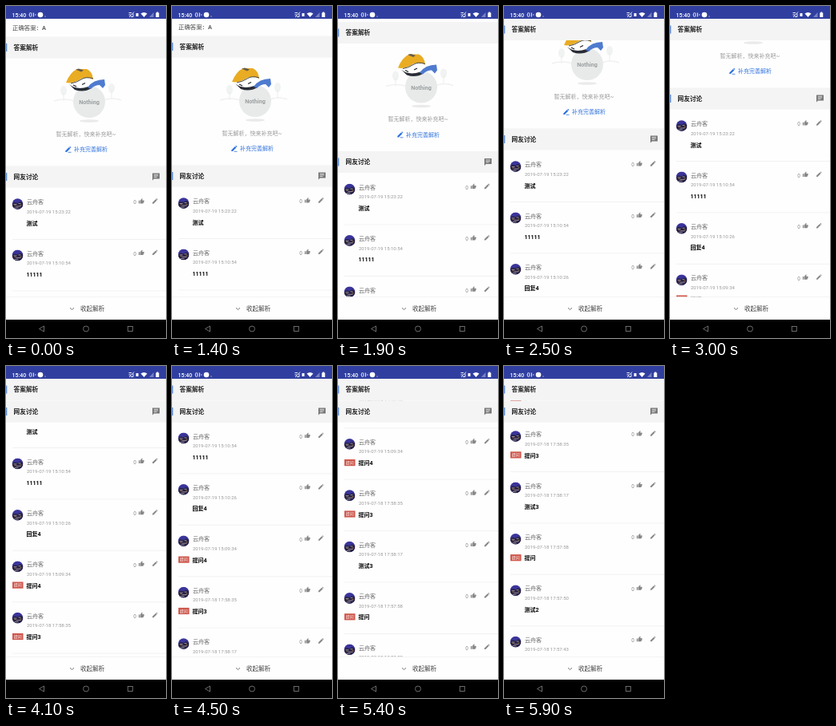
Animation, 200 px wide and 416 px high, one loop 6 s. Source, as an HTML page:

```html
<!DOCTYPE html>
<html lang="zh-CN">
<head>
<meta charset="utf-8">
<style>
  html, body { margin: 0; width: 100%; height: 100%; overflow: hidden; background: #fefefe; }
  svg { display: block; width: 100%; height: 100%; font-family: Roboto, "Noto Sans CJK SC", "Noto Sans CJK", sans-serif; }
</style>
</head>
<body>
<svg id="stage" viewBox="0 0 200 416">
  <defs>
    <clipPath id="disc"><circle r="6.8"/></clipPath>
    <g id="avatar" clip-path="url(#disc)">
      <rect x="-7" y="-7" width="14" height="14" fill="#3b349a"/>
      <path d="M-7 0L-4-2 0-1 3-3 7-1V7H-7Z" fill="#232045"/>
      <path d="M-5 .5h4M1-.5h3M-2 3h6M-4 5h5" stroke="#a99a9c" stroke-width=".9"/>
      <path d="M-4 2h2M3 1.5h2" stroke="#b9742f" stroke-width=".9"/>
    </g>
    <path id="pencil" d="M-3.6 3.6V1.8L1.4-3.2 3.2-1.4-1.8 3.6ZM1.9-3.7 2.5-4.2Q2.8-4.4 3.2-4.1L4.1-3.2Q4.4-2.8 4.2-2.5L3.7-1.9Z"/>
    <path id="thumb" d="M-3.8-.8h1.5v4.2h-1.5ZM-1.7 3.4V-.8L.8-3.9Q1.7-3.6 1.4-2.7L1-1.1H3.2Q4.2-.8 3.8.4L2.7 2.9Q2.4 3.4 1.9 3.4Z"/>
    <g id="tree" fill="#f1f2f2">
      <ellipse cy="-3" rx="4" ry="6"/><path d="M-.4 0h.8v10h-.8Z" fill="#e8eaea"/>
    </g>
  </defs>
  <g id="page"></g>
  <g id="talkHead"></g>
  <g id="answerHead"></g>
  <g id="chrome"></g>
</svg>
<script>
const ROW = 64.4, LOOP = 6000, STEP = 100;
const ANSWER_Y = 52, ANSWER_STOP = 29.5, TALK_Y = 214, TALK_STOP = 57;

// [time in ms, scrolled distance]
const SCROLL = [[0, 0], [1300, 0], [1400, 1], [2000, 22], [2500, 47], [3000, 98], [3600, 155.5],
  [4100, 190], [4500, 222], [5000, 324], [5200, 324], [5400, 343.5], [5900, 417.6]];

const COMMENTS = [
  ['测试', '19 15:23:22'], ['11111', '19 15:10:54'], ['回复4', '19 15:10:26'],
  ['提问4', '19 15:09:34', true], ['提问3', '18 17:58:35', true], ['测试3', '18 17:58:17'],
  ['提问', '18 17:57:58', true], ['测试2', '18 17:57:50'], ['测试', '18 17:57:43']
];

const el = id => document.getElementById(id);

// Text placed by its vertical middle
const text = (x, y, size, fill, value, attrs = '') =>
  `<text x="${x}" y="${y + size * .37}" font-size="${size}" fill="${fill}" ${attrs}>${value}</text>`;
const icon = (name, x, y, fill, scale = 1) =>
  `<use href="#${name}" fill="${fill}" transform="translate(${x} ${y}) scale(${scale})"/>`;

const header = title => `
  <rect y="-13.5" width="200" height="27" fill="#f4f4f4"/>
  <rect y="-5" width="1.3" height="10" fill="#5d8fe0"/>
  ${text(9.5, 0, 7.7, '#222', title, 'font-weight="700"')}`;

const comment = ([body, date, asked], i) => `
  <g transform="translate(0 ${246 + i * ROW})">
    ${icon('avatar', 14.5, 2, '')}
    ${text(26, -.3, 7, '#666', '云舟客')}
    ${text(26, 11.5, 6, '#999', '2019-07-' + date)}
    ${asked ? '<rect x="8" y="21.3" width="13.5" height="8.2" fill="#cf574c"/>' +
      text(14.7, 25.4, 5, '#fff', '提问', 'text-anchor="middle"') : ''}
    ${text(25.5, 26, 7, '#000', body, 'font-weight="700"')}
    ${text(159.3, 0, 6.4, '#888', '0')}
    ${icon('thumb', 169.3, -1.5, '#888', .9)}
    ${icon('pencil', 186, -1.3, '#888', .82)}
    <path d="M8 46.5H200" stroke="#ececec" stroke-width=".7"/>
  </g>`;

const illustration = `
  ${icon('tree', 72, 109, '')}${icon('tree', 132, 106, '')}
  <path d="M60 119Q72 115 86 119M122 118Q134 114 144 118" fill="none" stroke="#f0f1f1" stroke-width="1.5"/>
  <ellipse cx="104" cy="144" rx="12" ry="1.8" fill="#eaeaea"/>
  <circle cx="104" cy="120" r="20" fill="#e8eaea"/>
  <path d="M78 96L109 91 112 99Q104 106 92 106Q82 104 78 96Z" fill="#fff"/>
  <path d="M75 96Q80 83 89 79H101Q108 82 109 92Q103 88 94 91 84 98 75 96Z" fill="#e9ac22"/>
  <path d="M87 79.5L91 78.5 97 80.5 94 82.5Z" fill="#665b4c"/>
  <path d="M81 97Q88 96 94 92T109 91" fill="none" stroke="#333" stroke-width=".9"/>
  <path d="M84 99L88 101M95 98.5L99 96.5" stroke="#222" stroke-width="1.2"/>
  <path d="M79 98Q88 106 103 101L107 103Q97 109 86 105Z" fill="#292d36"/>
  <path d="M102 102Q109 92 123 92L124 99 121 103 117 99Q111 99 106 104Z" fill="#4f7bcf"/>
  ${text(104, 120.7, 7.2, '#9b9f9f', 'Nothing', 'text-anchor="middle" font-weight="700"')}`;

el('page').innerHTML = `
  ${text(8, 27, 7.4, '#444', '正确答案：A', 'font-weight="500"')}
  ${illustration}
  ${text(100, 160.3, 7, '#999', '暂无解析，快来补充吧~', 'text-anchor="middle"')}
  ${icon('pencil', 77.5, 179.8, '#2f72dd', .9)}
  <path d="M77.5 183.3H81.5" stroke="#2f72dd" stroke-width=".8"/>
  ${text(85, 179.6, 7, '#2f72dd', '补充完善解析')}
  ${COMMENTS.map(comment).join('')}`;

el('answerHead').innerHTML = header('答案解析');
el('talkHead').innerHTML = header('网友讨论') + `
  <path d="M183-4.5H192V2.5H185L183 4.5Z" fill="#777"/>
  <path d="M184.8-2.7H190.2M184.8-1.1H190.2M184.8.5H188.5" stroke="#f4f4f4" stroke-width=".7"/>`;

el('chrome').innerHTML = `
  <rect width="200" height="16" fill="#303f9f"/>
  ${text(7.5, 11, 7, '#fff', '15:40', 'font-weight="500"')}
  <g fill="none" stroke="#fff" stroke-width=".9">
    <path d="M30.5 8Q27.5 11 30.5 14M34.5 8.5V13.5M32 8.5V13.5M36 11H37.5"/>
    <path d="M153.5 8.5H157M153.5 11H156M154 14L160 7.5M159 9.5V13.5H156"/>
  </g>
  <g fill="#fff">
    <circle cx="43" cy="11" r="3.3"/><circle cx="49" cy="13" r=".6"/>
    <rect x="162.5" y="9" width="3" height="4"/>
    <path d="M168.5 9.5Q172.5 6.5 176.5 9.5L172.5 14Z"/>
    <path d="M179 14L184.5 8V14Z" opacity=".35"/>
    <path d="M187.3 8.5H188.3V7.5H190.3V8.5H191.3V14H187.3Z"/>
  </g>
  <rect y="364.3" width="200" height="4" rx="2" fill="#f0f0f0"/>
  <rect y="365" width="200" height="28.5" rx="2" fill="#fefefe"/>
  <path d="M80 378.2L82.5 380.6 85 378.2" fill="none" stroke="#666" stroke-width=".9"/>
  ${text(93, 379, 7.6, '#444', '收起解析', 'font-weight="500"')}
  <rect y="393" width="200" height="23" fill="#000"/>
  <g fill="none" stroke="#777" stroke-width=".9">
    <path d="M47.5 401V408L41.5 404.5Z"/><circle cx="100" cy="404.5" r="3.5"/>
    <rect x="152.3" y="401.5" width="6" height="6"/>
  </g>`;

function scrollAt(time) {
  const next = SCROLL.findIndex(([t]) => t > time);
  if (next < 0) return SCROLL.at(-1)[1];
  const [t0, a] = SCROLL[next - 1], [t1, b] = SCROLL[next];
  return a + (b - a) * (time - t0) / (t1 - t0);
}

const moveTo = (id, y) => el(id).setAttribute('transform', `translate(0 ${y})`);

function draw(now) {
  const scroll = scrollAt(Math.floor(now % LOOP / STEP) * STEP);
  moveTo('page', -scroll);
  moveTo('answerHead', Math.max(ANSWER_Y - scroll, ANSWER_STOP));
  moveTo('talkHead', Math.max(TALK_Y - scroll, TALK_STOP));
  requestAnimationFrame(draw);
}
draw(performance.now());
</script>
</body>
</html>
```
